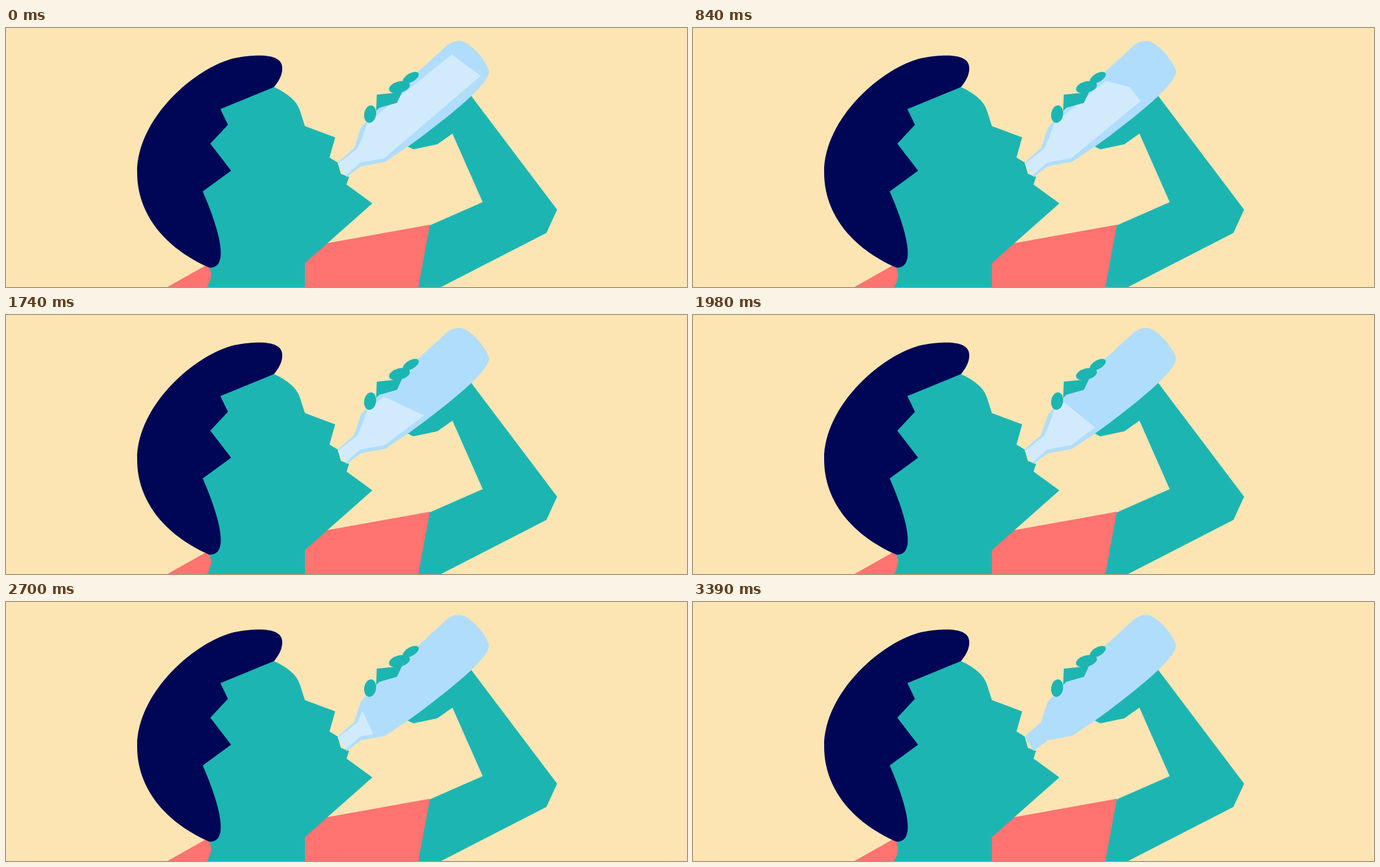
Recreate the animation shown at these times as an HTML page with a canvas. Size 1080x412 px, loop 3.75 s.

```html
<!DOCTYPE html>
<html lang="en">
<head>
<meta charset="utf-8">
<title>Drinking water</title>
<style>
html, body { margin: 0; width: 100%; height: 100%; overflow: hidden; background: #fce5b3; }
canvas { display: block; }
</style>
</head>
<body>
<canvas id="stage" width="1080" height="412"></canvas>
<script>
const ctx = document.getElementById('stage').getContext('2d');
const LOOP = 3750, STEP = 30;
const BG = '#fce5b3', SKIN = '#1db5b2', HAIR = '#000656', SHIRT = '#ff7370';
const GLASS = '#b0ddfb', WATER = '#d1ebfd';

const shape = (color, d) => ({ color, path: new Path2D(d) });

function finger(x, y, rx, ry, degrees) {
  const path = new Path2D();
  path.ellipse(x, y, rx, ry, degrees * Math.PI / 180, 0, Math.PI * 2);
  return { color: SKIN, path };
}

const back = [
  shape(SHIRT, 'M460 412V352L511 342L672 313L690 412Z'),
  shape(SKIN, 'M737 107L874 289L857 326L690 412H654L672 314L756 277L708 168L684 185L646 193L636 188L680 130Z'),
  shape(SKIN, 'M425 94C447 104 461 116 466 131L474 156L522 174L513 206L526 214L531 232L544 237L540 249L581 279L474 374V412H312L318 372L300 250L320 120Z'),
  shape(SHIRT, 'M256 412L318 377C328 385 327 398 319 412Z'),
  shape(HAIR, 'M425 94C435 82 439 71 438 62C437 45 412 39 362 48C302 62 208 142 208 230C208 296 252 350 322 381C352 384 344 334 312 260L357 227L324 184L352 154L340 129Z'),
  shape(GLASS, 'M526 214L552 191L563 158L588 131L652 71L700 27C708 21 718 19 726 22C742 29 761 52 766 68C767 78 752 95 737 109C715 130 672 164 637 189L601 213L563 220L540 237Z')
];

const hand = [
  shape(SKIN, 'M588 106L608 104L628 102L620 119L592 127L587 132Z'),
  finger(577.5, 137, 9.5, 14, 10),
  finger(624, 94, 17, 9, -15),
  finger(642, 79, 14, 7, -30)
];

// Inside of the bottle, from the far left corner round the neck to the shoulder
const inside = [[707, 42], [573, 151], [565, 174], [557, 192], [526, 216], [538, 235], [562, 214], [600, 207]];

// Ends of the water surface as the bottle drains
const levels = [
  { at: 0, left: [707, 42], right: [753, 76] },
  { at: 1740, left: [600, 130], right: [663, 160] },
  { at: 2250, left: [577, 150], right: [609, 200] },
  { at: 2700, left: [566, 175], right: [582, 209] },
  { at: 3390, left: [526, 217], right: [537, 236] }
];
const SWELL = levels[1].at, EMPTY = levels[levels.length - 1].at;

const mix = (a, b, p) => a.map((v, i) => v + (b[i] - v) * p);

function fill({ color, path }) {
  ctx.fillStyle = color;
  ctx.fill(path);
}

function trace(points) {
  ctx.beginPath();
  points.forEach(p => ctx.lineTo(...p));
  ctx.closePath();
}

function drawWater(t) {
  const i = levels.findIndex(level => level.at > t);
  const a = levels[i - 1], b = levels[i];
  const p = (t - a.at) / (b.at - a.at);
  const left = mix(a.left, b.left, p);
  const right = mix(a.right, b.right, p);
  const crest = mix(left, right, 0.69);
  if (t < SWELL) crest[1] -= 13 * Math.sin(Math.PI * t / SWELL);

  ctx.save();
  trace([mix(left, right, -0.3), left, crest, right, mix(left, right, 1.3), [620, 300], [480, 300], [480, 200]]);
  ctx.clip();
  trace([...inside, right]);
  ctx.fillStyle = WATER;
  ctx.fill();
  ctx.restore();
}

function draw(now) {
  const t = Math.floor((now % LOOP) / STEP) * STEP;
  ctx.fillStyle = BG;
  ctx.fillRect(0, 0, 1080, 412);
  back.forEach(fill);
  if (t < EMPTY) drawWater(t);
  hand.forEach(fill);
}

const start = performance.now();
function tick() {
  draw(performance.now() - start);
  requestAnimationFrame(tick);
}
tick();
</script>
</body>
</html>
```
